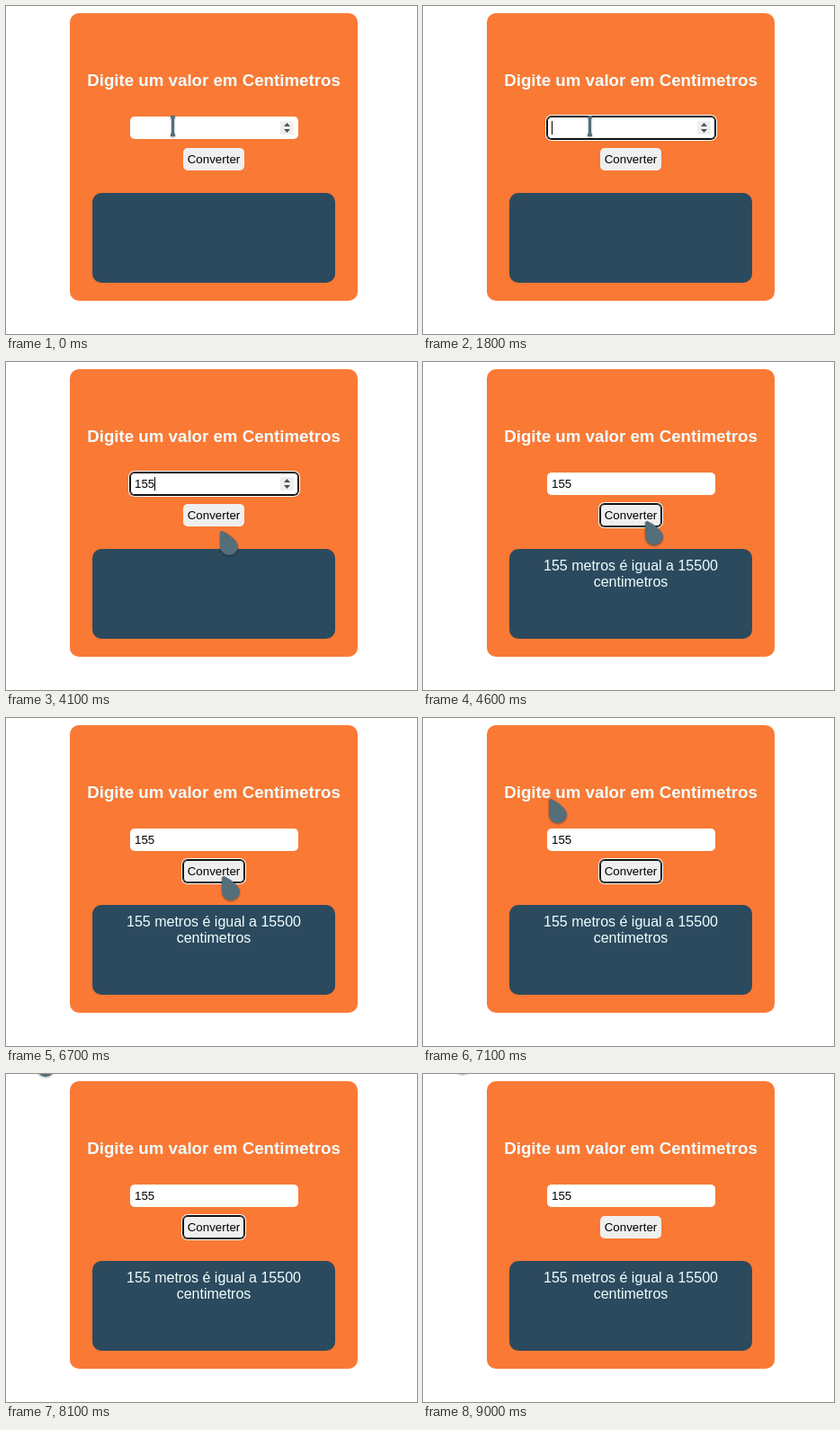
An HTML page that plays this animation: 457 by 365 pixels, repeating every 9.3 s.

```html
<!DOCTYPE html>
<html lang="pt-BR">
<head>
<meta charset="utf-8">
<title>Conversor</title>
<style>
  html, body { margin: 0; width: 100%; height: 100%; overflow: hidden; background: #fff; }
  body { position: relative; font: 13.3333px/15px "Liberation Sans", Arial, sans-serif; color: #000; }
  body *, .anim { box-sizing: border-box; }
  .abs, .abs > * { position: absolute; }

  .card { left: 71px; top: 8px; width: 320px; height: 320px; border-radius: 10px; background: #fa7935; }
  h3 { left: 0; top: 64px; width: 320px; margin: 0; text-align: center; font-size: 18.72px; line-height: 21px; color: azure; white-space: nowrap; }
  .field { left: 67px; top: 115px; width: 187px; height: 25px; border-radius: 5px; background: #fff; }
  .field > .value { left: 5px; top: 5px; white-space: nowrap; }
  .button { left: 126px; top: 150px; width: 68px; height: 25px; border-radius: 5px; background: #efefef; }
  .button > .label { left: 0; top: 5px; width: 68px; text-align: center; }
  .result { left: 25px; top: 200px; width: 270px; height: 100px; padding: 10px; border-radius: 10px; background: #2c4a5e; color: azure; font-size: 16px; line-height: 18px; text-align: center; }
  .result > span { position: static; display: block; }
  .ring { inset: 0; border-radius: 5px; box-shadow: inset 0 0 0 1px #101010, 0 0 0 1px #101010, 0 0 0 2px #fff; }
  .caret { left: 5px; top: 5px; width: 1px; height: 15px; background: #000; }
  .spinner { left: 167px; top: 5px; }
  .pointer { left: 0; top: 0; overflow: visible; filter: drop-shadow(0 1px 1px rgba(0, 0, 0, .4)); fill: #546e7a; }

  /* 9.3 s loop; every change is a hard step */
  .anim { animation: 9.3s step-end infinite; }
  .field .ring { animation-name: field-focus; }
  .spinner { animation-name: spinner; }
  .button .ring { animation-name: button-focus; }
  .result span { animation-name: answer; }
  .d1 { animation-name: digit1; }
  .d2 { animation-name: digit2; }
  .d3 { animation-name: digit3; }
  .caret { animation-name: blink, advance; }
  .beam { animation-name: beam; }
  .drop { animation-name: drop, travel; }

  @keyframes field-focus { 0%, 48.38%, 100% { opacity: 0 } 6.45% { opacity: 1 } }
  @keyframes spinner { 0% { opacity: 1 } 48.38%, 100% { opacity: 0 } }
  @keyframes button-focus { 0%, 96.77%, 100% { opacity: 0 } 48.38% { opacity: 1 } }
  @keyframes answer { 0% { opacity: 0 } 49.46%, 100% { opacity: 1 } }
  @keyframes digit1 { 0% { opacity: 0 } 25.8%, 100% { opacity: 1 } }
  @keyframes digit2 { 0% { opacity: 0 } 29.03%, 100% { opacity: 1 } }
  @keyframes digit3 { 0% { opacity: 0 } 31.18%, 100% { opacity: 1 } }
  @keyframes blink {
    0%, 12.9%, 37.63%, 48.38%, 100% { opacity: 0 }
    6.45%, 19.35%, 44.08% { opacity: 1 }
  }
  @keyframes advance {
    0% { transform: none }
    25.8% { transform: translateX(7px) }
    29.03% { transform: translateX(15px) }
    31.18%, 100% { transform: translateX(22px) }
  }
  @keyframes beam { 0% { opacity: 1 } 39.78%, 100% { opacity: 0 } }
  @keyframes drop { 0% { opacity: 0 } 39.78%, 100% { opacity: 1 } }
  @keyframes travel {
    0%, 39.78% { transform: translate(195px, 174px) }
    40.86% { transform: translate(203px, 188px) }
    41.93% { transform: translate(215px, 195px) }
    43.01% { transform: translate(228px, 194px) }
    44.08% { transform: translate(238px, 188px) }
    45.16% { transform: translate(244px, 181px) }
    46.23% { transform: translate(247px, 177px) }
    72.04% { transform: translate(240px, 176px) }
    73.11% { transform: translate(225px, 165px) }
    74.19% { transform: translate(201px, 142px) }
    75.26% { transform: translate(172px, 117px) }
    76.34% { transform: translate(140px, 90px) }
    77.41% { transform: translate(109px, 64px) }
    78.49% { transform: translate(80px, 40px) }
    79.56% { transform: translate(56px, 21px) }
    80.64% { transform: translate(40px, 7px) }
    81.72% { transform: translate(34px, 2px) }
    82.79% { transform: translate(34px, -1px) }
    83.87% { transform: translate(34px, -6px) }
    84.94% { transform: translate(34px, -12px) }
    86.02% { transform: translate(34px, -18px) }
    87.09% { transform: translate(34px, -24px) }
    88.17%, 100% { transform: translate(34px, -27px) }
  }
</style>
</head>
<body>
  <div class="abs card">
    <h3>Digite um valor em Centimetros</h3>
    <div class="abs field">
      <div class="anim ring"></div>
      <div class="value"><span class="anim d1">1</span><span class="anim d2">5</span><span class="anim d3">5</span></div>
      <div class="anim caret"></div>
      <svg class="anim spinner" width="15" height="15">
        <rect width="15" height="15" fill="#efefef"/>
        <path d="M4 6L7.5 2 11 6ZM4 9L7.5 13 11 9Z" fill="#505050"/>
      </svg>
    </div>
    <div class="abs button">
      <div class="anim ring"></div>
      <div class="label">Converter</div>
    </div>
    <div class="abs result"><span class="anim">155 metros é igual a 15500 centimetros</span></div>
  </div>
  <svg class="abs anim pointer beam" width="457" height="365">
    <path d="M183 122h5v2.5l-1 1v16l1 1v2.5h-5v-2.5l1-1v-16l-1-1Z"/>
  </svg>
  <svg class="abs anim pointer drop" width="21" height="28">
    <path d="M0 3C0 .5 1.5-.5 3.5.5 9 3 20 11 20 17A10 10 0 0 1 0 17Z"/>
  </svg>
</body>
</html>
```
